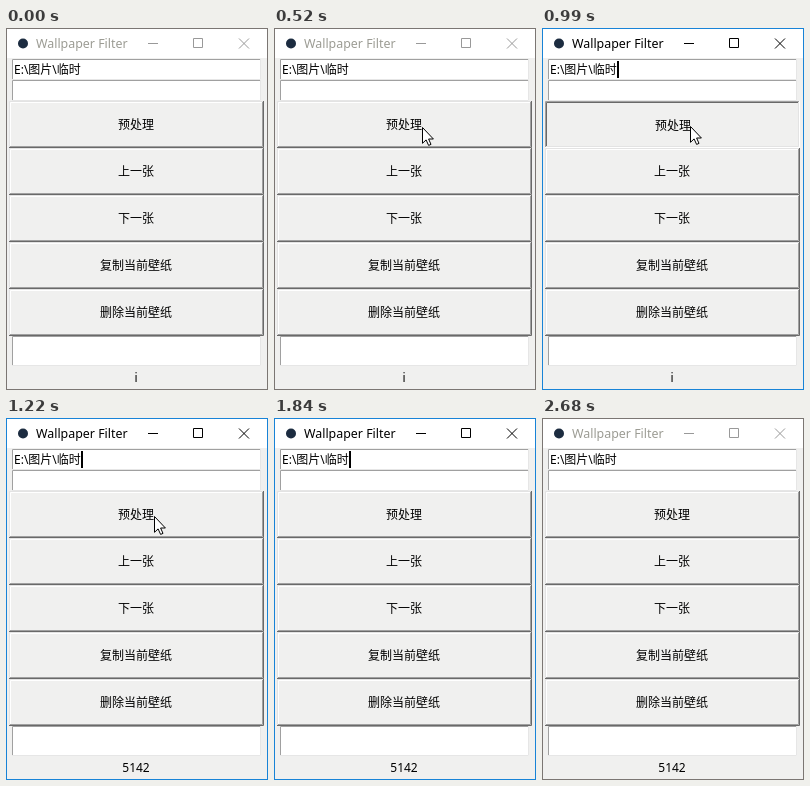
An HTML page that plays this animation: 262x362 px, repeating every 2850 ms.

```html
<!DOCTYPE html>
<html lang="zh-CN">
<head>
<meta charset="utf-8">
<style>
html, body { margin: 0; width: 100%; height: 100%; overflow: hidden; background: #f0f0ef; }
svg { position: absolute; left: 0; top: 0; display: block; }
text { font: 12px 'Noto Sans', 'Noto Sans CJK SC', 'Noto Sans CJK JP', sans-serif; fill: #000; }
.mid { text-anchor: middle; }
#title { font-size: 12.4px; }
#title, #controls { transition: none; }
</style>
</head>
<body>
<svg id="stage" width="262" height="362" viewBox="0 0 262 362">
  <rect width="262" height="362" fill="#f0f0ef"/>
  <rect width="262" height="30" fill="#fff"/>
  <circle cx="17" cy="15.5" r="5" fill="#1c2c40"/>
  <text id="title" x="30" y="20">Wallpaper Filter</text>
  <path id="controls" fill="none" d="M142 15.5h10M187.5 10.5h9v9h-9zM233 10.5l10 10M243 10.5l-10 10"/>
  <g id="widgets"></g>
  <text x="8" y="46">E:\图片\临时</text>
  <rect id="caret" x="75" y="33" width="2" height="17"/>
  <text id="count" class="mid" x="130" y="354"></text>
  <rect id="frame" x=".5" y=".5" width="261" height="361" fill="none"/>
  <path id="cursor" d="M.5 .5V16.3L4.1 12.9L6.6 18.4L9 17.4L6.6 12H11.4Z" fill="#fff" stroke="#000"/>
</svg>
<script>
const LOOP = 2850;
const $ = id => document.getElementById(id);
const widgets = $('widgets');

function add(parent, tag, attrs, text = '') {
  const el = document.createElementNS(parent.namespaceURI, tag);
  for (const key in attrs) el.setAttribute(key, attrs[key]);
  el.textContent = text;
  return parent.appendChild(el);
}

// One-pixel bevel: light or dark along the top/left and bottom/right edges.
function bevel(parent, x, y, w, h, topLeft, bottomRight) {
  add(parent, 'path', { d: `M${x + .5} ${y + h - 1}V${y + .5}H${x + w - 1}`, fill: 'none', stroke: topLeft });
  add(parent, 'path', { d: `M${x} ${y + h - .5}H${x + w - .5}V${y}`, fill: 'none', stroke: bottomRight });
}

function entry(y, h) {
  add(widgets, 'rect', { x: 6, y, width: 249, height: h, fill: '#fff' });
  bevel(widgets, 6, y, 249, h, '#a0a0a0', '#e6e6e6');
}

function button(label, y, pressed) {
  const g = add(widgets, 'g', {});
  const [tl, tl2, br, br2] = pressed
    ? ['#a0a0a0', '#696969', '#fff', '#e3e3e3']
    : ['#e3e3e3', '#fff', '#696969', '#a0a0a0'];
  bevel(g, 3, y, 255, 47, tl, br);
  bevel(g, 4, y + 1, 253, 45, tl2, br2);
  const shift = pressed ? 1 : 0;
  add(g, 'text', { class: 'mid', x: 130 + shift, y: y + 28 + shift }, label);
  return g;
}

entry(31, 21);
entry(52, 21);
entry(308, 30);
const [raised] = ['预处理', '上一张', '下一张', '复制当前壁纸', '删除当前壁纸']
  .map((label, i) => button(label, 73 + 47 * i, false));
const sunken = button('预处理', 73, true);

// [time, x, y]; no position means the pointer is outside the window
const pointer = [
  [0], [150, 174, 335], [225, 150, 225], [300, 140, 151], [380, 143, 122],
  [450, 147, 104], [520, 148, 99], [840, 148, 98], [1300, 149, 100],
  [1370, 151, 106], [1450, 154, 119], [1530, 156, 152], [1600, 157, 208],
  [1680, 157, 275], [1760, 157, 345], [1840]
];
const within = (t, from, to) => t >= from && t < to;
const show = (el, on) => el.setAttribute('visibility', on ? 'visible' : 'hidden');

function draw(t) {
  const active = within(t, 990, 2680);
  const pressed = within(t, 990, 1220);
  $('title').style.fill = active ? '#000' : '#9c9c94';
  $('controls').setAttribute('stroke', active ? '#000' : '#999');
  $('frame').setAttribute('stroke', active ? '#1883d7' : '#7b7673');
  show(raised, !pressed);
  show(sunken, pressed);
  show($('caret'), within(t, 990, 1530) || within(t, 1840, 2450));
  $('count').textContent = t < 1220 ? 'i' : '5142';

  const [, x, y] = pointer.findLast(step => t >= step[0]);
  show($('cursor'), x !== undefined);
  if (x !== undefined) $('cursor').setAttribute('transform', `translate(${x} ${y})`);
}

function tick() {
  draw(performance.now() % LOOP);
  requestAnimationFrame(tick);
}
tick();
</script>
</body>
</html>
```
